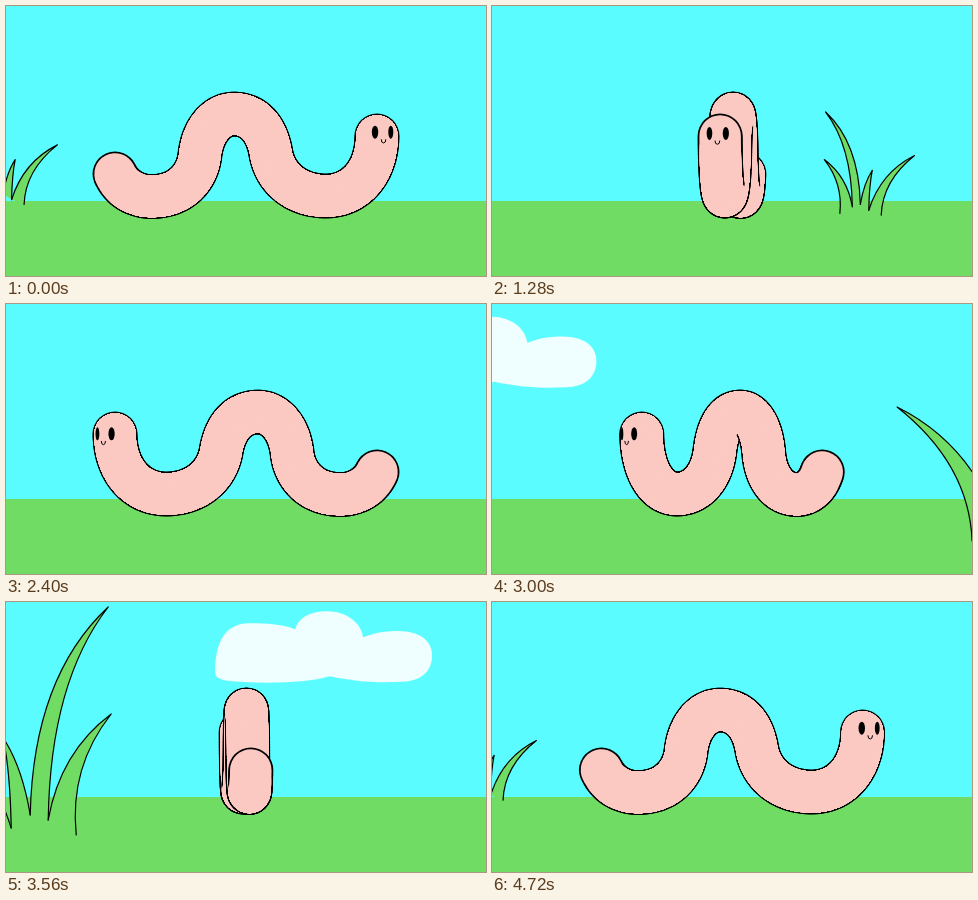
An HTML page with a canvas that plays this animation: 480x270 px, repeating every 4.76 s.

```html
<!DOCTYPE html>
<html lang="en">
<head>
<meta charset="utf-8">
<title>Turning worm</title>
<style>
  html, body { margin: 0; width: 100%; height: 100%; overflow: hidden; background: #5afcff; }
  canvas { display: block; width: 480px; height: 270px; }
</style>
</head>
<body>
<canvas id="stage" width="480" height="270"></canvas>
<script>
const LOOP = 4760, TURN = 2 * Math.PI, RAD = Math.PI / 180;
const SKY = '#5afcff', GREEN = '#71dc64', PINK = '#fbc9c2', CLOUD = '#effeff', INK = '#000';
const ctx = document.getElementById('stage').getContext('2d');

// Centre line of the body seen from the side, from tail to head
const spine = document.createElementNS('http://www.w3.org/2000/svg', 'path');
spine.setAttribute('d', 'M109 168C116 183 130 190.5 146 190.5C175 190.5 192 171 194 148' +
  'C197 124 211 108 228 108C247 108 261 122 265 148C270 174 292 190 320 190C351 190 371 164 371 130');
const STEPS = 130, length = spine.getTotalLength();
const body = Array.from({ length: STEPS + 1 }, (_, i) => spine.getPointAtLength(length * i / STEPS));

const cloud = new Path2D('M207 70C207 45 214 21 241 21C260 21 275 22 287 27' +
  'C291 14 304 9 319 9C338 9 353 20 355 35C368 30 380 28 394 29C414 30 424 40 424 53' +
  'C424 70 412 79 394 79.5C367 81 345 79 322 74C302 80 270 81 240 80C222 79 207 79 207 70Z');

// Blades of one tuft, around its middle on the ground line
const blades = [
  'M-47 19Q-50 -58 -122 -115Q-46 -77 -19 8',
  'M-19 8Q-20 -48 -27 -82Q-8 -53 0 -5',
  'M0 -5Q3 -143 78 -213Q20 -138 18 0',
  'M18 0Q30 -68 81 -106Q39 -53 46 15'
].map(d => new Path2D(d));

// Longitude of the face on the head, in degrees
const faceKeys = [[0, 17], [720, 7], [1800, -20], [3000, -42], [3560, -165], [4200, -302], [LOOP, -343]];

function keyed(keys, t) {
  const i = keys.findIndex(k => k[0] > t);
  const [t0, a] = keys[i - 1], [t1, b] = keys[i];
  return a + (b - a) * (t - t0) / (t1 - t0);
}

function drawCloud(t) {
  const a = TURN * (t - 3430) / LOOP;
  if (Math.cos(a) < 0) return;
  ctx.save();
  ctx.translate(240 + 454 * Math.sin(a) - 316, 24 * (1 - Math.cos(a)));
  ctx.fillStyle = CLOUD;
  ctx.fill(cloud);
  ctx.restore();
}

function drawTuft(x, y, sx, sy) {
  ctx.save();
  ctx.translate(x, y);
  ctx.scale(sx, sy);
  ctx.fillStyle = GREEN;
  ctx.strokeStyle = INK;
  ctx.lineWidth = 1.2 / sy;
  for (const blade of blades) {
    ctx.fill(blade);
    ctx.stroke(blade);
  }
  ctx.restore();
}

function drawFace(head, t) {
  const turn = keyed(faceKeys, t) * RAD;
  const y = 128 - 2 * Math.cos(TURN * (t - 300) / LOOP);
  ctx.fillStyle = ctx.strokeStyle = INK;
  for (const side of [-22, 22]) {
    const a = turn + side * RAD, c = Math.cos(a);
    if (c <= 0) continue;
    ctx.beginPath();
    ctx.ellipse(head.x + 22 * Math.sin(a), y, 3.2 * c, 6.5, 0, 0, TURN);
    ctx.fill();
  }
  const c = Math.cos(turn);
  if (c <= 0) return;
  ctx.lineWidth = 1;
  ctx.beginPath();
  ctx.ellipse(head.x + 22.5 * Math.sin(turn), y + 7.5, 2.4 * c, 3.3, 0, 0, Math.PI);
  ctx.stroke();
}

// Discs are laid far to near; repainting the latest stretch leaves ink only where the body overlaps itself
function drawWorm(t) {
  const a = TURN * t / LOOP - 1.5 * RAD;
  const angle = a + RAD * Math.sin(2 * a);
  const points = body.map(p => ({ x: 240 + (p.x - 240) * Math.cos(angle), y: p.y }));
  const head = points[STEPS];
  const headNear = Math.sin(angle) > 0;
  if (!headNear) points.reverse();
  ctx.lineCap = ctx.lineJoin = 'round';
  points.forEach((p, i) => {
    ctx.fillStyle = INK;
    ctx.beginPath();
    ctx.arc(p.x, p.y, 22.5, 0, TURN);
    ctx.fill();
    ctx.strokeStyle = PINK;
    ctx.lineWidth = 41.5;
    ctx.beginPath();
    for (const q of points.slice(Math.max(0, i - 15), i + 1)) ctx.lineTo(q.x, q.y);
    ctx.stroke();
  });
  drawFace(head, t);
}

function draw(t) {
  ctx.fillStyle = SKY;
  ctx.fillRect(0, 0, 480, 270);
  drawCloud(t);
  ctx.fillStyle = GREEN;
  ctx.fillRect(0, 195, 480, 75);

  const back = t > 4200 ? t - LOOP : t;
  if (back < 2000) drawTuft(-3 + 0.175 * back + 7e-8 * back ** 3, 190 + back / 120, -1 / 2.25, 1 / 2.25);
  drawWorm(t);
  if (t > 2500 && t < 4000) drawTuft(528 - 0.898 * (t - 3000), 218, 1, 1);
}

const start = performance.now();
function tick() {
  draw((performance.now() - start) % LOOP);
  requestAnimationFrame(tick);
}
tick();
</script>
</body>
</html>
```
